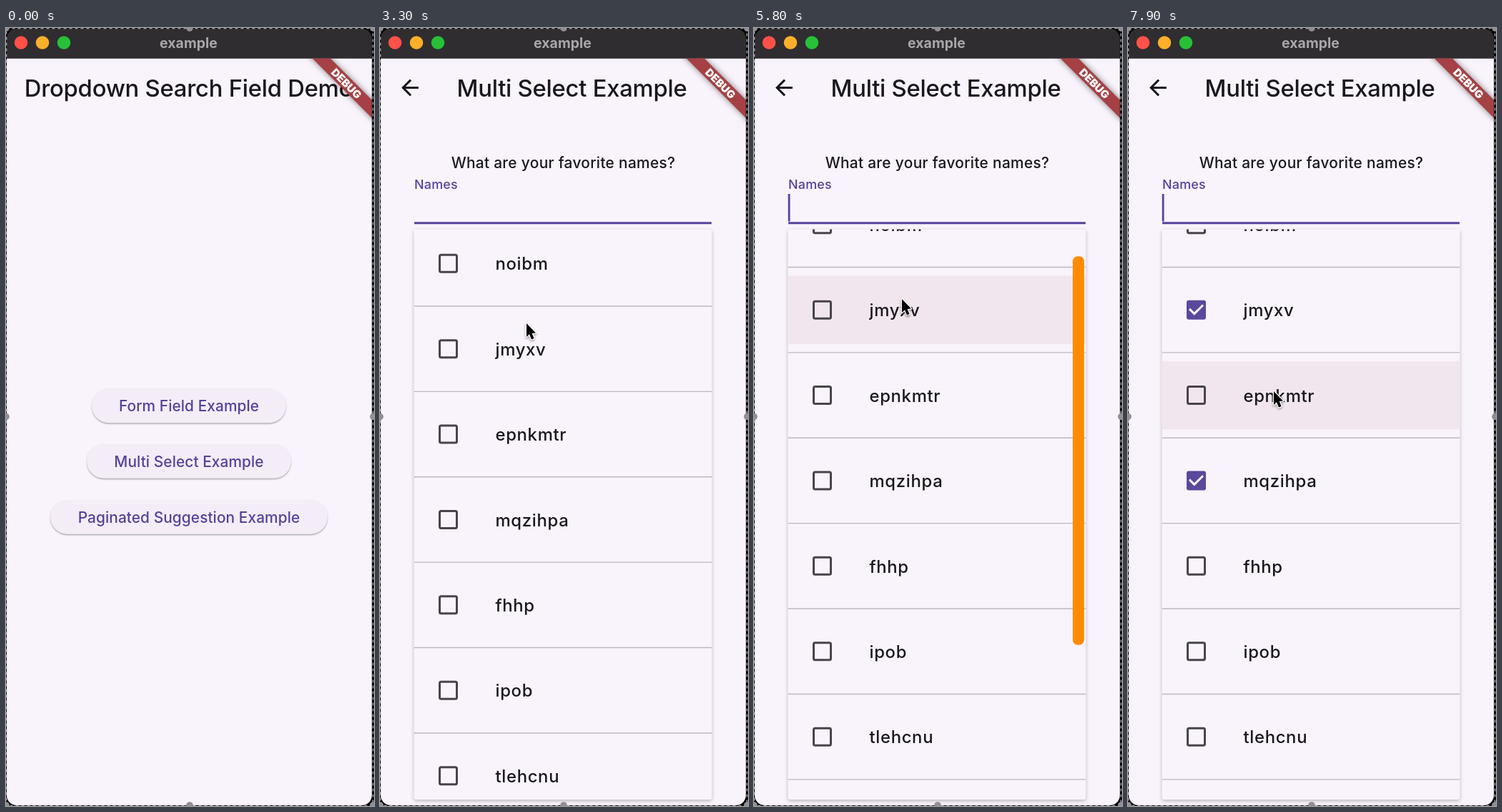
Recreate the animation shown at these times as an HTML page with a canvas. Size 515 by 1088 pixels, loop 8000 ms.

```html
<!DOCTYPE html>
<html lang="en">
<head>
<meta charset="utf-8">
<title>Dropdown demo</title>
<style>
  html, body { margin: 0; width: 100%; height: 100%; overflow: hidden; background: #000; }
  canvas { display: block; width: 515px; height: 1088px; }
</style>
</head>
<body>
<canvas id="stage" width="515" height="1088"></canvas>
<script>
const g = document.getElementById('stage').getContext('2d');
const LOOP = 8000, PAGE = '#f9f3fb', INK = '#19171c', PURPLE = '#54429a', GREY = '#48434c';
const ITEMS = ['noibm', 'jmyxv', 'epnkmtr', 'mqzihpa', 'fhhp', 'ipob', 'tlehcnu', 'mzlx', 'djje', 'vkhda'];
const BAR = 42.5, TOP = 281.5, VIEW = 797.5, TILE = 95.5, PITCH = 119.4;
const CONTENT = PITCH * 9 + TILE;
const OPEN = 2300;

// Keys: [time, value, ...]
const POINTER = [
  [300, 205, 668], [900, 165, 608], [1300, 165, 608], [1900, 146, 285], [2100, 146, 285],
  [2250, 150, 252], [2500, 150, 252], [3300, 204, 412], [4000, 204, 412], [4600, 199, 578],
  [4900, 199, 578], [5500, 206, 378], [6450, 206, 378], [7000, 175, 595], [7500, 175, 595],
  [7800, 203, 507]
];
const SCROLL = [[3650, 0], [4000, 251.5], [4250, 374], [4450, 374], [4800, 98], [5300, 54.5]];
const CHECKED = { 1: 6300, 3: 7450 };

const clamp = v => Math.max(0, Math.min(1, v));
const ramp = (t, a, b) => clamp((t - a) / (b - a));
const smooth = p => p * p * (3 - 2 * p);
const easeOut = p => 1 - (1 - p) ** 3;

function track(keys, t) {
  if (t <= keys[0][0]) return keys[0].slice(1);
  for (let i = 1; i < keys.length; i++) {
    const a = keys[i - 1], b = keys[i];
    if (t < b[0]) {
      const p = smooth(ramp(t, a[0], b[0]));
      return a.slice(1).map((v, k) => v + (b[k + 1] - v) * p);
    }
  }
  return keys[keys.length - 1].slice(1);
}

// y is the middle of the capital letters
function text(s, x, y, size, color, { weight = 450, gap = 0, align = 'left' } = {}) {
  g.font = `${weight} ${size}px Inter, "Open Sans", sans-serif`;
  g.letterSpacing = gap + 'px';
  g.textAlign = align;
  g.fillStyle = color;
  g.fillText(s, x, y + size * 0.3635);
}

function rect(x, y, w, h, color, r = 0) {
  g.fillStyle = color;
  g.beginPath();
  g.roundRect(x, y, w, h, r);
  g.fill();
}

function disc(x, y, r, color) {
  g.fillStyle = color;
  g.beginPath();
  g.arc(x, y, r, 0, 7);
  g.fill();
}

function shadow(color, blur, dy) {
  g.shadowColor = color;
  g.shadowBlur = blur;
  g.shadowOffsetY = dy;
}

function layer(draw) {
  g.save();
  draw();
  g.restore();
}

function heading(s, x) {
  text(s, x, 84, 32.8, INK, { gap: -0.25, align: 'center' });
}

function button(label, y, w) {
  layer(() => {
    shadow('rgba(0,0,0,.3)', 2, 1.5);
    rect(256 - w / 2, y - 24.2, w, 48, '#f4edf8', 24);
  });
  text(label, 256, y, 20.9, PURPLE, { weight: 550, gap: 0.05, align: 'center' });
}

function home() {
  rect(0, BAR, 513, 1046, PAGE);
  heading('Dropdown Search Field Demo', 255.5);
  button('Form Field Example', 528.5, 272);
  button('Multi Select Example', 606, 286);
  button('Paginated Suggestion Example', 684, 388);
}

const ARROW = new Path2D('M20 11H7.83l5.59-5.59L12 4l-8 8 8 8 1.41-1.41L7.83 13H20v-2z');

function form(t) {
  rect(0, BAR, 513, 1046, PAGE);
  layer(() => {
    g.translate(24.1, 65.6);
    g.scale(1.49, 1.49);
    g.fillStyle = INK;
    g.fill(ARROW);
  });
  heading('Multi Select Example', 268.5);
  text('What are your favorite names?', 256.5, 188, 20.9, INK, { gap: 0.3, align: 'center' });
  button('Submit', 1015, 144);

  const focus = smooth(ramp(t, OPEN, OPEN + 170));
  text('Names', 48, 239.5 - 21 * focus, 23.9 - 6 * focus, focus > 0.5 ? PURPLE : GREY, { gap: 0.6 - 0.35 * focus });
  if (focus) rect(48, 271.2, 416, 3, PURPLE);
  else rect(48, 273, 416, 1.4, '#6b6670');
  const caretOn = t < 3150 || (t + 350) % 1000 < 500;
  if (focus && caretOn) rect(47.7, 232, 2.8, 38.5, PURPLE);
  if (t > OPEN + 100) list(t);
}

function checkbox(y, on) {
  if (!on) {
    g.strokeStyle = GREY;
    g.lineWidth = 3;
    g.beginPath();
    g.roundRect(83.5, y - 12, 24, 24, 2);
    g.stroke();
    return;
  }
  rect(82, y - 13.5, 27, 27, '#5b489c', 3);
  g.strokeStyle = '#fff';
  g.lineWidth = 3;
  g.beginPath();
  g.moveTo(86, y - 1.3);
  g.lineTo(92.8, y + 5.4);
  g.lineTo(105, y - 6.7);
  g.stroke();
}

function list(t) {
  const h = VIEW * easeOut(ramp(t, OPEN + 100, OPEN + 600));
  const [s] = track(SCROLL, t), [, py] = track(POINTER, t);
  layer(() => {
    shadow('rgba(0,0,0,.25)', 5, 2);
    rect(47.5, TOP, 417, h, PAGE, 3);
  });
  layer(() => {
    g.beginPath();
    g.rect(47.5, TOP, 417, h);
    g.clip();
    ITEMS.forEach((name, i) => {
      const y = TOP - s + i * PITCH, mid = y + TILE / 2;
      if (t > 5300 && py >= y && py < y + TILE) rect(47.5, y, 417, TILE, '#f1e6ee');
      if (i < 9) rect(47.5, mid + PITCH / 2 - 0.7, 417, 1.4, '#bdb8c0');
      checkbox(mid, t >= CHECKED[i]);
      text(name, 161.5, mid + 0.5, 23.9, INK, { gap: 0.65 });
    });
    g.globalAlpha = ramp(t, 3650, 3850) * (1 - ramp(t, 5900, 6200));
    const k = VIEW / CONTENT;
    rect(446, TOP + 0.5 + s * k, 16, VIEW * k, '#ff8c00', 7);
  });
}

function banner() {
  layer(() => {
    g.beginPath();
    g.rect(0, BAR, 512, 1046);
    g.clip();
    g.translate(512, 42);
    g.rotate(Math.PI / 4);
    layer(() => {
      shadow('rgba(0,0,0,.5)', 9, 0);
      rect(-70, 41.4, 140, 17.8, '#a54144');
    });
    text('DEBUG', 0, 50.3, 15.1, '#fff', { weight: 900, align: 'center' });
  });
}

function pointer(t) {
  if (t < POINTER[0][0]) return;
  const [x, y] = track(POINTER, t);
  layer(() => {
    g.translate(x, y);
    g.beginPath();
    [[1, 1], [1, 20], [5, 16.3], [8, 23.5], [11.6, 22], [8.6, 15], [14, 14.5]]
      .forEach(p => g.lineTo(...p));
    g.closePath();
    g.lineWidth = 2.6;
    g.lineJoin = 'round';
    g.strokeStyle = '#fff';
    shadow('rgba(0,0,0,.4)', 3, 1.5);
    g.stroke();
    shadow('transparent', 0, 0);
    g.fillStyle = '#000';
    g.fill();
  });
}

function frame() {
  rect(0, 0, 515, 1088, '#000');
  layer(() => {
    g.beginPath();
    g.roundRect(1, 1, 511, 1086, 14);
    g.clip();
    rect(0, 0, 515, 44, '#2f2d30');
  });
  ['#ff5148', '#ffb02a', '#28c038'].forEach((c, i) => disc(21 + 30 * i, 20.5, 9.3, c));
  text('example', 255.5, 20.5, 19.5, '#a9a7ab', { weight: 700, align: 'center' });
}

function selection() {
  layer(() => {
    g.strokeStyle = '#a5a2a7';
    g.lineWidth = 1.6;
    g.setLineDash([4, 4]);
    g.strokeRect(0.5, 0.5, 513, 1087);
  });
  for (const x of [0, 257, 514])
    for (const y of [0, 543.5, 1087])
      if (x !== 257 || y !== 543.5) disc(x, y, 4.8, '#918e94');
}

function draw(t) {
  frame();
  layer(() => {
    g.beginPath();
    g.roundRect(1, BAR, 511, 1087 - BAR, [0, 0, 14, 14]);
    g.clip();
    const slide = easeOut(ramp(t, 1100, 1600));
    if (slide < 1) layer(() => { g.translate(-170 * slide, 0); home(); });
    if (slide > 0) layer(() => { g.translate(512 * (1 - slide), 0); form(t); });
  });
  banner();
  selection();
  pointer(t);
}

const start = performance.now();
function tick() {
  draw((performance.now() - start) % LOOP);
  requestAnimationFrame(tick);
}
tick();
</script>
</body>
</html>
```
